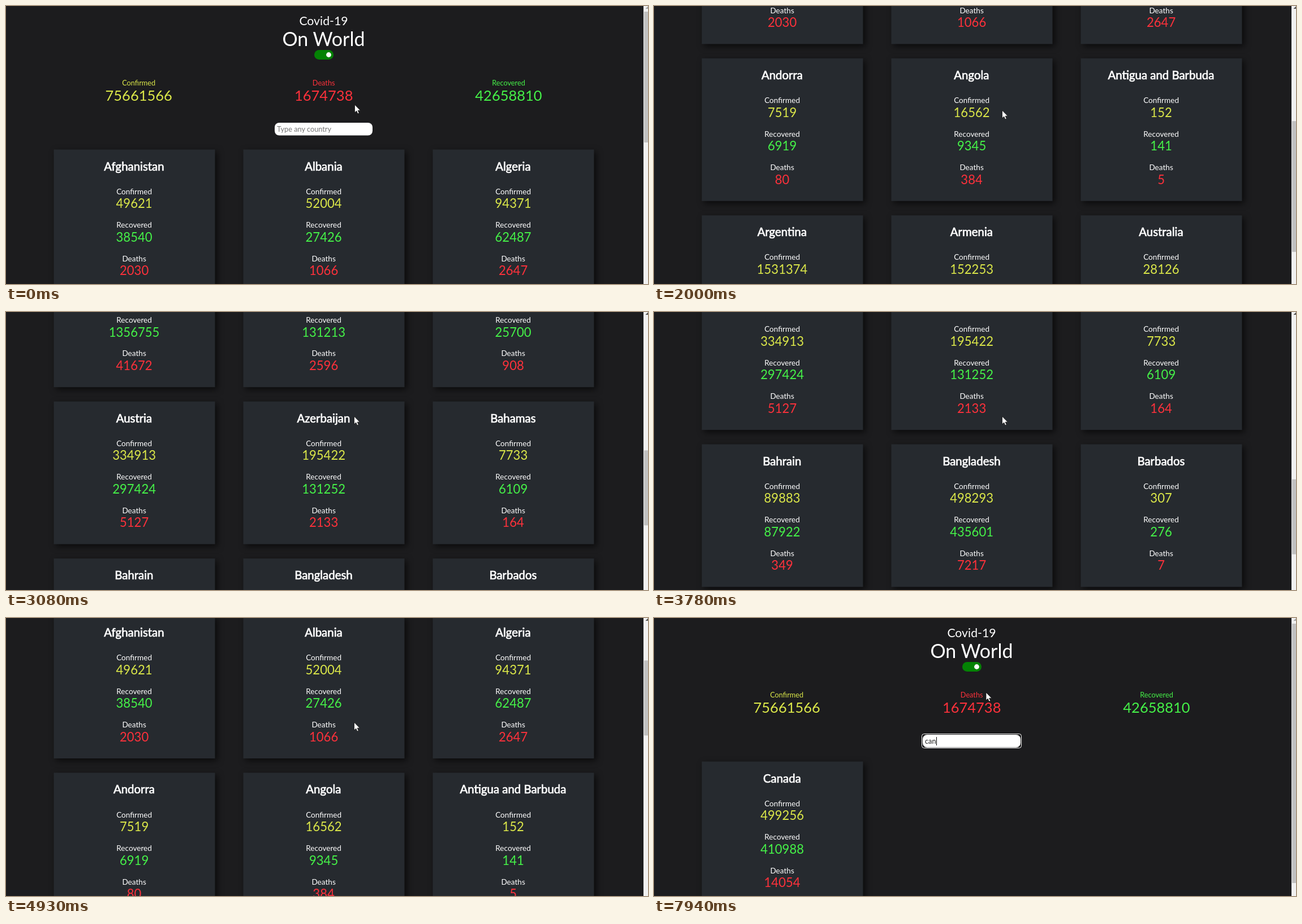
Write an HTML page that moves like this. It is 1135x493 px and loops after 8000 ms.

```html
<!DOCTYPE html>
<html lang="en">
<head>
<meta charset="utf-8">
<title>Covid-19 On World</title>
<style>
  html, body { margin: 0; width: 100%; height: 100%; overflow: hidden; background: #1c1c1e; }
  svg { display: block; width: 1135px; height: 493px; font-family: Lato, sans-serif; }
  text { fill: #fff; text-anchor: middle; }
  .small { font-size: 12.75px; }
  .total { font-size: 25.5px; }
  .label { font-size: 13.6px; }
  .count { font-size: 22.1px; }
  .name { font-size: 20.4px; stroke: #fff; stroke-width: .7px; }
  .confirmed { fill: #dbe749; }
  .recovered { fill: #45f248; }
  .deaths { fill: #fd313b; }
  .card rect { fill: #262a2f; filter: drop-shadow(4px 4px 6px rgba(0, 0, 0, .65)); }
  #typed { text-anchor: start; }
</style>
</head>
<body>
<svg viewBox="0 0 1135 493">
  <g id="page">
    <text x="561.5" y="33.5" font-size="21.25">Covid-19</text>
    <text x="561.5" y="70.5" font-size="34">On World</text>
    <rect x="545" y="78" width="34" height="17" rx="8.5" fill="#048204"/>
    <circle cx="570.5" cy="86.5" r="4.4" fill="#fff"/>
    <g id="totals"></g>
    <g id="ring" fill="none">
      <rect x="474.5" y="206.5" width="174" height="23" rx="4" stroke="#101010"/>
      <rect x="473.5" y="205.5" width="176" height="25" rx="4" stroke="#fff"/>
    </g>
    <rect x="475" y="207" width="173" height="22.5" rx="8" fill="#fff"/>
    <text id="typed" class="small" x="479" y="223"></text>
    <rect id="caret" y="211" width="1" height="15"/>
    <g id="cards"></g>
  </g>
  <rect x="1127" width="8" height="493" fill="#f1f1f1"/>
  <path id="arrow" d="M1130.5 5L1135 .5V5z"/>
  <rect id="thumb" x="1128" width="7" fill="#c1c1c1"/>
  <path id="cursor" d="M0 0V14L3.2 11L5.4 16L7.8 15L5.6 10.2H10z" fill="#fff" stroke="#111" stroke-width=".8"/>
</svg>
<script>
const LOOP = 8000, TICK = 77.08, VIEW = 526;
const $ = id => document.getElementById(id);

// name, confirmed, recovered, deaths
const countries = [
  ['Afghanistan', 49621, 38540, 2030], ['Albania', 52004, 27426, 1066], ['Algeria', 94371, 62487, 2647],
  ['Andorra', 7519, 6919, 80], ['Angola', 16562, 9345, 384], ['Antigua and Barbuda', 152, 141, 5],
  ['Argentina', 1531374, 1356755, 41672], ['Armenia', 152253, 131213, 2596], ['Australia', 28126, 25700, 908],
  ['Austria', 334913, 297424, 5127], ['Azerbaijan', 195422, 131252, 2133], ['Bahamas', 7733, 6109, 164],
  ['Bahrain', 89883, 87922, 349], ['Bangladesh', 498293, 435601, 7217], ['Barbados', 307, 276, 7],
  ['Belarus', 171579, 149612, 1309], ['Belgium', 619390, 42118, 18371], ['Belize', 9617, 7528, 212]
];
const canada = ['Canada', 499256, 410988, 14054];
const matches = [['Cambodia', 362, 319, 0], ['Cameroon', 25359, 23851, 445], canada];

// Keys are [tick, values...]
const scrollKeys = [[10, 0], [16, 260], [19, 260], [23, 412.5], [25, 412.5], [29, 589], [31, 589], [36, 910],
  [39, 910], [44, 1112], [48, 1112], [52, 1250], [53, 1250], [56, 975.5], [64, 258.5], [68, 0]];
const cursorKeys = [[10, 616.5, 175], [12, 615.5, 185], [69, 615.5, 185], [72, 610, 205], [74, 607, 213],
  [76, 606, 211], [77, 605, 206], [79, 595, 160], [80, 589.5, 138], [81, 587, 132]];
const typing = [[83, 'c'], [86, 'ca'], [88, 'can'], [90, 'cana'], [102, 'can']];
const thumbSizes = [[0, 232], [29, 133], [86, 308], [88, 460]];
const caretBlinks = [[0, 0], [74, 1], [80, 0], [83, 1], [96, 0], [102, 1]];

const smooth = p => p * p * (3 - 2 * p);
const linear = p => p;
const latest = (steps, n) => (steps.findLast(s => s[0] <= n) || [0, ''])[1];

function tween(keys, n, ease) {
  const i = keys.findIndex(k => k[0] > n);
  if (i < 0) return keys.at(-1).slice(1);
  if (i === 0) return keys[0].slice(1);
  const a = keys[i - 1], b = keys[i];
  const p = ease((n - a[0]) / (b[0] - a[0]));
  return a.slice(1).map((v, j) => v + (b[j + 1] - v) * p);
}

const text = (x, y, cls, s) => `<text x="${x}" y="${y}" class="${cls}">${s}</text>`;

function card([name, ...counts], i) {
  const x = i % 3 * 335, y = Math.floor(i / 3) * 278.4;
  const rows = ['Confirmed', 'Recovered', 'Deaths'].map((s, j) =>
    text(226.6, 333.7 + j * 59.5, 'label', s) +
    text(226.6, 358.3 + j * 59.5, 'count ' + s.toLowerCase(), counts[j])).join('');
  return `<g class="card" transform="translate(${x} ${y})">
    <rect x="84.5" y="254.5" width="285" height="253"/>${text(226.4, 291.5, 'name', name)}${rows}</g>`;
}

$('totals').innerHTML = [['Confirmed', 75661566, 234.7], ['Deaths', 1674738, 561.7], ['Recovered', 42658810, 888.5]]
  .map(([s, count, x]) => text(x, 140.5, 'small ' + s.toLowerCase(), s) +
    text(x, 168, 'total ' + s.toLowerCase(), count)).join('');

let shown;
function show(list) {
  if (list === shown) return;
  shown = list;
  $('cards').innerHTML = list.map(card).join('');
}

function draw(now) {
  const n = Math.floor((now % LOOP + 10) / TICK);
  const [scroll] = tween(scrollKeys, n, n < 53 ? smooth : linear);
  const [cx, cy] = tween(cursorKeys, n, linear);
  const query = latest(typing, n), size = latest(thumbSizes, n);

  show(n < 83 ? countries : n < 88 ? matches : [canada].concat === 0 ? [] : single);
  $('page').setAttribute('transform', `translate(0 ${-scroll})`);
  $('cursor').setAttribute('transform', `translate(${cx} ${cy})`);
  $('thumb').setAttribute('y', 10 + scroll * size / VIEW);
  $('thumb').setAttribute('height', size);
  $('arrow').setAttribute('fill', scroll ? '#505050' : '#a3a3a3');

  const typed = $('typed');
  typed.textContent = query || 'Type any country';
  typed.style.fill = query ? '#222' : '#757575';
  $('caret').setAttribute('x', query ? Math.round(479 + typed.getComputedTextLength()) : 479);
  $('caret').style.opacity = latest(caretBlinks, n);
  $('ring').style.opacity = n < 74 ? 0 : 1;
  requestAnimationFrame(() => draw(performance.now() - start));
}

const single = [canada];
const start = performance.now();
draw(0);
</script>
</body>
</html>
```
